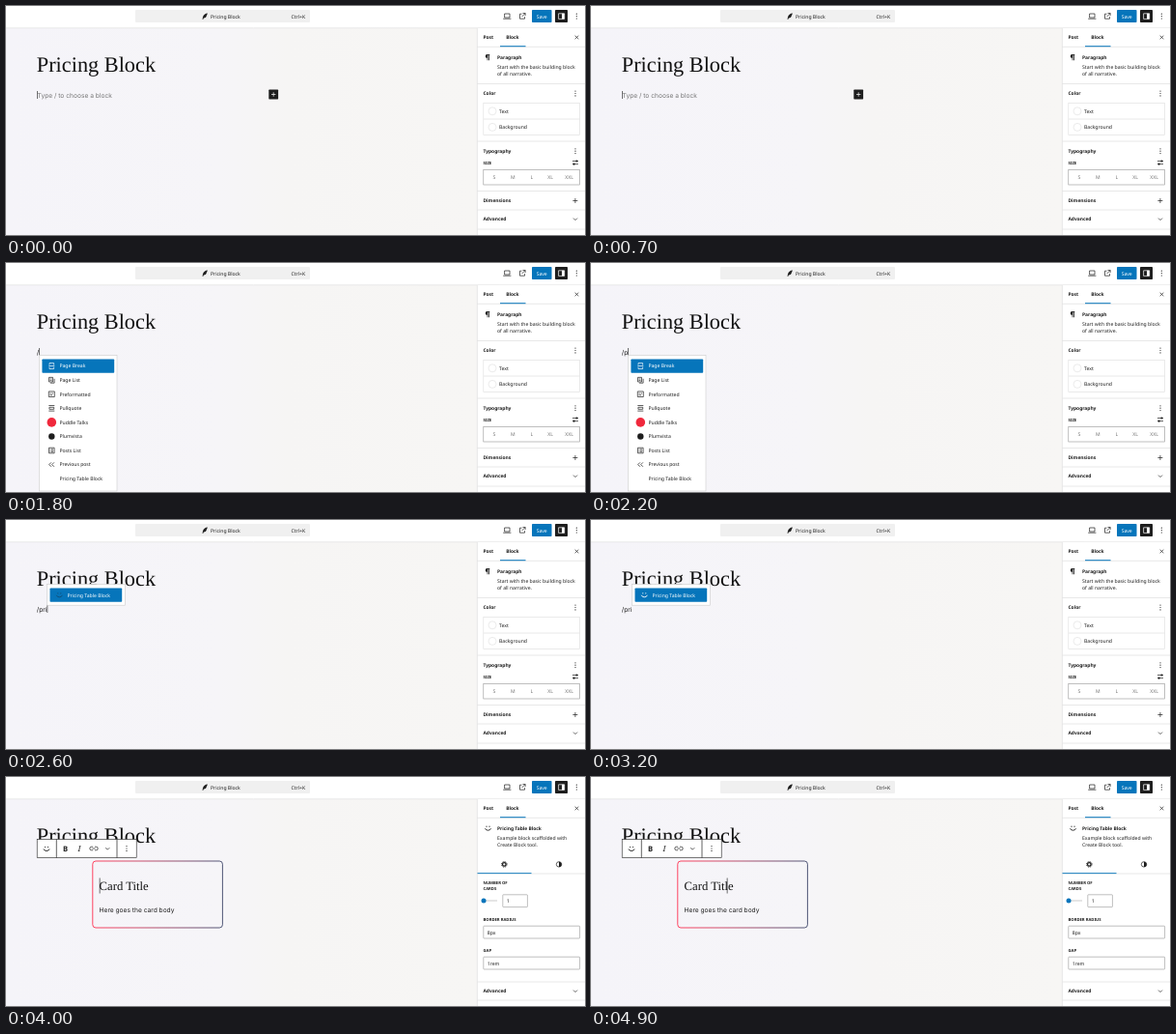
Animation, 600 px wide and 237 px high, one loop 5500 ms. Source, as an HTML page:

```html
<!DOCTYPE html>
<html lang="en">
<head>
<meta charset="utf-8">
<title>Pricing Block editor</title>
<style>
  html, body { margin: 0; width: 100%; height: 100%; overflow: hidden; background: #fff; }
  svg { display: block; width: 100%; height: 100%; }
  text { font: 5.1px "Noto Sans", "Open Sans", sans-serif; fill: #1e1e1e; text-rendering: geometricPrecision; white-space: pre; }
  .b { font-size: 4.9px; font-weight: 600; }
  .cap { font-size: 4.2px; font-weight: 600; }
  .mid { text-anchor: middle; }
  .grey { fill: #757575; }
  .white { fill: #fff; }
  .body { font: 6.65px Inter, sans-serif; }
  .serif { font-family: "Liberation Serif", serif; fill: #111; }
  .line { fill: none; stroke: #1e1e1e; stroke-width: .7; }
  .rule { stroke: #e2e2e2; stroke-width: .8; }
  .field { fill: #fff; stroke: #949494; stroke-width: .6; }
</style>
</head>
<body>
<svg id="stage" viewBox="0 0 600 237" preserveAspectRatio="none"></svg>
<script>
const LOOP = 5500, BLUE = '#0675bb', INK = '#1e1e1e';
const stage = document.getElementById('stage');

const text = (x, y, s, cls = '', extra = '') => `<text x="${x}" y="${y}" class="${cls}" ${extra}>${s}</text>`;
const box = (x, y, w, h, fill, extra = '') => `<rect x="${x}" y="${y}" width="${w}" height="${h}" fill="${fill}" ${extra}/>`;
const path = (d, extra = '') => `<path d="${d}" class="line" ${extra}/>`;
const rule = (x1, y1, x2, y2) => `<path d="M${x1} ${y1}L${x2} ${y2}" class="rule"/>`;
const solid = (d, fill = INK) => `<path d="${d}" fill="${fill}"/>`;
const disc = (x, y, r, fill = INK) => `<circle cx="${x}" cy="${y}" r="${r}" fill="${fill}"/>`;
const dots = (x, y) => [-2.4, 0, 2.4].map(d => disc(x, y + d, .6)).join('');
const chevron = (x, y) => path(`M${x - 2} ${y - 1}l2 2 2-2`);
const caret = (x, y, h) => box(x, y, .6, h, '#111');
const at = (x, y, s) => `<g transform="translate(${x} ${y})">${s}</g>`;
// Shown during each "from-to" span, in ms
const on = (spans, ...parts) => `<g data-on="${spans}">${parts.join('')}</g>`;

const pilcrow = (x, y) => at(x, y, solid('M2.3-3H-.4a1.9 1.9 0 0 0 0 3.8V3.3H.4V-2.2H1.1V3.3H1.9V-2.2H2.3Z'));
const smile = (x, y, color = INK) => at(x, y,
  disc(-1.5, -1.8, .6, color) + disc(1.5, -1.8, .6, color) +
  `<path d="M-3 .2Q-2.4 2.2 0 2.2T3 .2" fill="none" stroke="${color}" stroke-width=".9"/>`);

function header() {
  return box(0, 0, 600, 23, '#fff') + rule(0, 22.8, 600, 22.8) +
    box(134, 4, 181, 13, '#f0f0f0', 'rx="1"') +
    solid('M203.6 14Q203.6 8.5 208.6 7.2Q209 9 207.4 10.2L208 10.4Q206.6 12.6 204.8 12.4L204.2 14Z') +
    text(212, 12.5, 'Pricing Block') + text(295.5, 12.5, 'Ctrl+K') +
    path('M516.6 8h5.4v4h-5.4zM515.2 13.2h8.2') +
    path('M534.5 8.2h-2v5h5v-2M535.5 7.5h2.6v2.6M538 7.6l-3.4 3.4') +
    box(545, 4, 20.5, 13, BLUE, 'rx=".8"') + text(555.2, 12.5, 'Save', 'white mid') +
    box(569, 4, 13, 13, INK, 'rx=".8"') +
    path('M572.6 7.8h6v5.6h-6z', 'style="stroke:#fff"') + box(576, 7.8, 2.6, 5.6, '#fff') +
    dots(591.3, 10.6);
}

function paragraphPanel() {
  const sizes = ['S', 'M', 'L', 'XL', 'XXL'].map((s, i) => text(506 + 19.4 * i, 179, s, 'mid grey')).join('');
  const swatches = ['Text', 'Background'].map((s, i) => {
    const y = 108.8 + 16.6 * i;
    return `<circle cx="504" cy="${y}" r="4" fill="#fff" stroke="#ddd" stroke-width=".6"/>` + text(511, y + 1.9, s);
  }).join('');
  return pilcrow(499, 53) + text(509, 54.8, 'Paragraph', 'b') +
    text(509, 64.8, 'Start with the basic building block') + text(509, 72, 'of all narrative.') +
    rule(488, 80.5, 600, 80.5) + text(494.5, 92.4, 'Color', 'b') + dots(590, 90.5) +
    box(494.8, 100.4, 99.8, 33.2, '#fff', 'stroke="#ddd" stroke-width=".6"') + rule(495, 117, 594.5, 117) + swatches +
    rule(488, 140, 600, 140) + text(494.5, 152, 'Typography', 'b') + dots(590, 150.2) +
    text(494.5, 163.8, 'SIZE', 'cap') +
    path('M587 160.5h6M587 163.6h6') + disc(591.4, 160.5, 1.1) + disc(588.6, 163.6, 1.1) +
    box(494.8, 169.4, 99.8, 15.6, '#fff', 'class="field"') + sizes +
    rule(488, 191.5, 600, 191.5) + text(494.5, 203.4, 'Dimensions', 'b') + path('M587.4 201.5h5M589.9 199v5') +
    rule(488, 211, 600, 211) + text(494.5, 222.4, 'Advanced', 'b') + chevron(590, 220.6);
}

function pricingPanel() {
  const field = (x, y, w, s) => box(x, y, w, 12.8, '#fff', 'class="field" rx=".6"') + text(x + 4, y + 8.3, s);
  return smile(499.5, 53) + text(509, 54.8, 'Pricing Table Block', 'b') +
    text(509, 64.8, 'Example block scaffolded with') + text(509, 72, 'Create Block tool.') +
    `<circle cx="516.3" cy="90.4" r="1.8" fill="none" stroke="${INK}" stroke-width="1.3"/>` +
    `<circle cx="516.3" cy="90.4" r="2.8" fill="none" stroke="${INK}" stroke-width="1" stroke-dasharray="1.1"/>` +
    '<circle cx="573" cy="90.4" r="2.7" class="line"/>' + solid('M573 87.7a2.7 2.7 0 0 1 0 5.4z') +
    rule(488, 100, 600, 100) + box(488.5, 99.2, 56, .9, BLUE) +
    text(494.5, 111.2, 'NUMBER OF', 'cap') + text(494.5, 117.2, 'CARDS', 'cap') +
    box(495, 127.5, 14, 1, '#ccc') + disc(495, 128.1, 2.5, BLUE) +
    field(514.8, 121.8, 25.6, '1') +
    text(494.5, 148.8, 'BORDER RADIUS', 'cap') + field(494.8, 154.2, 99.8, '8px') +
    text(494.5, 180.8, 'GAP', 'cap') + field(494.8, 186.2, 99.8, '1rem') +
    rule(488, 212, 600, 212) + text(494.5, 223.4, 'Advanced', 'b') + chevron(590, 221.6);
}

function sidebar() {
  return box(488, 23, 112, 214, '#fff') + rule(488.4, 23, 488.4, 237) +
    text(494.5, 34.4, 'Post', 'b') + text(518.3, 34.4, 'Block', 'b') +
    rule(488, 42.3, 600, 42.3) + box(512, 41.2, 26.5, 1, BLUE) +
    path('M589.7 30.6l3.6 3.6M593.3 30.6l-3.6 3.6') +
    on('0-4000', paragraphPanel()) + on('4000-5500', pricingPanel()) + rule(488, 231, 600, 231);
}

const blocks = [
  ['Page Break', path('M-2.3-1V-3h4.6v2M-2.3 1V3h4.6V1M-3 0h6', 'style="stroke:#fff"')],
  ['Page List', path('M-2.8-2.8h4v4.6h-4zM2.8-1.4V3H-1.4M-1.7-1.2h1.8M-1.7.3h1.8')],
  ['Preformatted', path('M-3-2.8h6v5.6h-6zM-1.8-.8h1.4M.3-.8h1.5M-1.8 1h2.5')],
  ['Pullquote', path('M-3-2.8h6M-3 2.8h6M-2.4-1h4.8v2h-4.8z')],
  ['Puddle Talks', disc(0, 0, 4.8, '#f0283c')],
  ['Plumvista', disc(0, 0, 3.2)],
  ['Posts List', path('M-2.8-2.8h5.6v5.6h-5.6zM-1.6-1.2h.8M-.2-1.2h1.8M-1.6.1h.8M-.2.1h1.8M-1.6 1.4h.8M-.2 1.4h1.8')],
  ['Previous post', path('M-.4-2.2l-2.2 2.2 2.2 2.2M2.6-2.2l-2.2 2.2 2.2 2.2')],
  ['Pricing Table Block', '']
];

const popover = (x, y, w, h) => box(x, y, w, h, '#fff', 'stroke="#ccc" stroke-width=".6"');

function menu(x) {
  const rows = blocks.map(([name, icon], i) => {
    const y = 11 + 14.57 * i;
    return at(12.9, y, icon) + text(21, y + 1.9, name, i ? '' : 'white');
  }).join('');
  return at(x, 95.6, popover(0, 0, 80.6, 140.4) + box(3, 3.8, 74.8, 14.4, BLUE, 'rx=".8"') + rows);
}

function match() {
  return popover(42.5, 66.4, 80.8, 21.8) + box(45.5, 70.4, 74.7, 14.4, BLUE, 'rx=".8"') +
    on('3800-4000',
      box(45.8, 70.7, 74.1, 13.8, 'none', 'rx=".8" stroke="#0b5688" stroke-width=".7"'),
      box(46.7, 71.6, 72.3, 12, 'none', 'stroke="#cfe4f1" stroke-width=".5"')) +
    on('2500-2800', smile(55.3, 77.6, '#124f78')) + on('2800-4000', smile(55.3, 77.6, '#fff')) +
    text(63.4, 79.5, 'Pricing Table Block', 'white');
}

function toolbar(w, ...parts) {
  return box(32.2, 64.4, w, 19.2, '#fff', `stroke="${INK}" stroke-width=".6"`) +
    parts.join('') + dots(w + 22, 74) + path(`M${w + 12} 64.4v19.2`);
}

function card() {
  return box(89.8, 87, 134.6, 69, 'none', 'rx="3.2" stroke="url(#edge)" stroke-width=".9"') +
    text(96.6, 116.6, 'Card Title', 'serif', 'style="font-size:12.7px"') +
    text(96.6, 139.7, 'Here goes the card body', 'body') +
    on('4000-4600', caret(96.8, 104.5, 16)) + on('4900-5500', caret(140.8, 104.5, 16));
}

const linkIcon = path('M90-1.8h-1.4a1.8 1.8 0 0 0 0 3.6H90M92-1.8h1.4a1.8 1.8 0 0 1 0 3.6H92M89.4 0h3.2', 'transform="translate(0 74)"');

stage.innerHTML = `<defs>
  <linearGradient id="paper"><stop offset="0" stop-color="#f5f4f9"/><stop offset=".45" stop-color="#f6f5f8"/><stop offset=".6" stop-color="#f6f5f4"/><stop offset="1" stop-color="#f7f6f4"/></linearGradient>
  <linearGradient id="edge"><stop offset="0" stop-color="#ff3050"/><stop offset=".35" stop-color="#c83a5c"/><stop offset="1" stop-color="#3c4468"/></linearGradient>
</defs>` +
  box(0, 23, 488, 214, 'url(#paper)') + header() + sidebar() +
  text(31.8, 67.6, 'Pricing Block', 'serif', 'style="font-size:22.3px"') +
  on('0-1500',
    text(32.6, 94.5, 'Type / to choose a block', 'body grey'),
    box(272.3, 86.6, 9.8, 9.8, INK, 'rx=".6"'),
    path('M275 91.5h4.4M277.2 89.3v4.4', 'style="stroke:#fff"')) +
  on('0-100 700-1300', caret(32, 88, 8)) +
  on('1500-2200', text(31.8, 94.5, '/', 'body'), caret(34.3, 88, 8)) +
  on('1700-2200', menu(34.4)) +
  on('2200-2300', text(31.8, 94.5, '/p', 'body'), caret(38.4, 88, 8), menu(38.4)) +
  on('2300-2500', text(31.8, 94.5, '/pr', 'body'), caret(40.8, 88, 8), menu(40.8)) +
  on('2500-4000', text(31.8, 94.5, '/pri', 'body')) +
  on('2500-3200', caret(42.6, 88, 8)) +
  on('3400-4000', toolbar(123, pilcrow(40.6, 74), chevron(125.4, 74.4))) +
  on('2500-4000', match()) +
  on('4000-5500', card(), toolbar(103,
    smile(42, 74.3), path('M52.3 64.4v19.2'),
    text(61.5, 76.8, 'B', 'mid', 'style="font-size:7.6px;font-weight:700"'),
    text(76, 76.8, 'I', 'mid', 'style="font:italic 8px \'Noto Serif\',serif"'),
    linkIcon, chevron(105.3, 74.2)));

const timed = [...stage.querySelectorAll('[data-on]')].map(el => ({
  el, spans: el.dataset.on.split(' ').map(s => s.split('-').map(Number))
}));

const start = performance.now();
function draw() {
  const t = (performance.now() - start) % LOOP;
  for (const { el, spans } of timed)
    el.style.display = spans.some(([a, b]) => t >= a && t < b) ? '' : 'none';
  requestAnimationFrame(draw);
}
draw();
</script>
</body>
</html>
```
